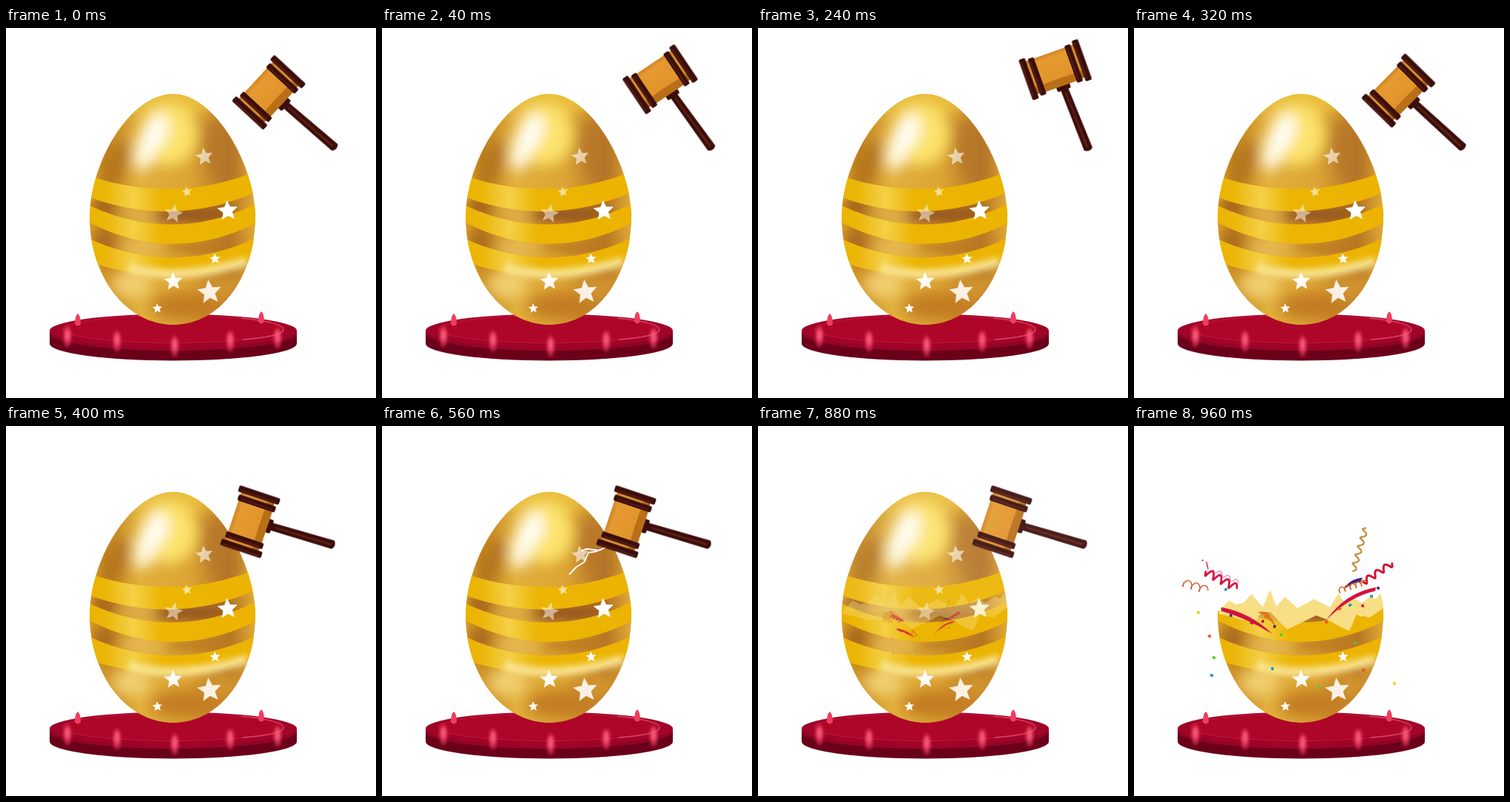
These frames come from a looping animation (500x500 px, 1.28 s). An HTML page:

```html
<!DOCTYPE html>
<html lang="en">
<head>
<meta charset="utf-8">
<title>Golden egg</title>
<style>
html, body { margin: 0; width: 100%; height: 100%; overflow: hidden; background: #fff; }
svg { display: block; width: 100vw; height: 100vh; }
.hammer, .old, .shell, .party, .crack, .crack path { animation: 1280ms -1ms infinite step-end; }
.hammer { animation-name: swing; }
.old { animation-name: vanish; }
.shell { animation-name: appear; }
.party { animation-name: burst; transform-origin: 228px 290px; }
.crack { animation-name: crackFade; fill: none; stroke: #fff; stroke-width: 2; stroke-linejoin: round; }
.crack path { stroke-dasharray: 1 2; }
.crack .first { animation-name: firstCrack; }
.crack .rest { animation-name: restCrack; }
@keyframes swing {
  0% { transform: rotate(-47.2deg); animation-timing-function: steps(4); }
  12.5% { transform: rotate(6.3deg); animation-timing-function: steps(6); }
  31.25%, 100% { transform: rotate(-71.5deg); }
}
@keyframes firstCrack {
  0%, 31.25% { stroke-dashoffset: 1.02; }
  31.25% { animation-timing-function: steps(4); }
  43.75%, 100% { stroke-dashoffset: 0; }
}
@keyframes restCrack {
  0%, 31.25% { stroke-dashoffset: 1.02; }
  31.25% { animation-timing-function: steps(7); }
  53.125%, 100% { stroke-dashoffset: 0; }
}
@keyframes crackFade {
  0% { opacity: 0; }
  34.375%, 53.125% { opacity: 1; }
  53.125% { animation-timing-function: steps(5); }
  68.75%, 100% { opacity: 0; }
}
@keyframes vanish {
  0% { opacity: 1; }
  68.75% { opacity: .93; }
  71.875% { opacity: .55; }
  75%, 100% { opacity: 0; }
}
@keyframes appear {
  0% { opacity: 0; }
  68.75% { opacity: .38; }
  71.875% { opacity: .7; }
  75%, 100% { opacity: 1; }
}
@keyframes burst {
  0% { opacity: 0; transform: scale(.05); }
  65.625% { opacity: 1; transform: scale(.05); animation-timing-function: steps(3); }
  75%, 100% { opacity: 1; transform: scale(1); }
}
</style>
</head>
<body>
<svg viewBox="0 0 500 500">
<defs>
  <path id="eggShape" d="M226 89C283 89 337 187 337 255C337 335 290 401 226 401C162 401 113 335 113 255C113 184 166 89 226 89Z"/>
  <clipPath id="eggClip"><use href="#eggShape"/></clipPath>
  <clipPath id="lowClip"><path d="M100 250H118L150 252L180 251L225 250L262 254L300 252L345 244V410H100Z"/></clipPath>
  <filter id="soft" x="-60%" y="-60%" width="220%" height="220%"><feGaussianBlur stdDeviation="9"/></filter>
  <filter id="sheen" x="-20%" y="-100%" width="140%" height="300%"><feGaussianBlur stdDeviation="4"/></filter>
  <filter id="glow" x="-100%" y="-100%" width="300%" height="300%"><feGaussianBlur stdDeviation="2"/></filter>
  <linearGradient id="gold" x1="0" x2="1">
    <stop offset="0" stop-color="#dfa72a"/><stop offset=".1" stop-color="#c2841f"/>
    <stop offset=".3" stop-color="#e2b03c"/><stop offset=".6" stop-color="#dca434"/>
    <stop offset=".84" stop-color="#b87828"/><stop offset="1" stop-color="#e0ab35"/>
  </linearGradient>
  <linearGradient id="band" gradientUnits="userSpaceOnUse" x1="113" x2="337" y1="0" y2="0">
    <stop offset="0" stop-color="#ebb300"/><stop offset=".1" stop-color="#ecb60a"/>
    <stop offset=".26" stop-color="#f4d046"/><stop offset=".44" stop-color="#ecb504"/>
    <stop offset="1" stop-color="#ecb300"/>
  </linearGradient>
  <linearGradient id="wood" x1="0" x2="0" y1="0" y2="1">
    <stop offset="0" stop-color="#d18424"/><stop offset=".14" stop-color="#e59a31"/>
    <stop offset=".78" stop-color="#e2942b"/><stop offset=".8" stop-color="#bf741a"/><stop offset="1" stop-color="#a8610f"/>
  </linearGradient>
  <linearGradient id="side" x1="0" x2="1">
    <stop offset="0" stop-color="#8d0325"/><stop offset=".5" stop-color="#a00529"/><stop offset="1" stop-color="#8d0325"/>
  </linearGradient>
  <polygon id="star" points="0,-1 .27,-.37 .95,-.31 .43,.14 .59,.81 0,.46 -.59,.81 -.43,.14 -.95,-.31 -.27,-.37"/>
  <g id="egg" clip-path="url(#eggClip)">
    <use href="#eggShape" fill="url(#gold)"/>
    <g filter="url(#soft)">
      <ellipse cx="228" cy="98" rx="62" ry="20" fill="#e9bd3a"/>
      <ellipse cx="148" cy="185" rx="13" ry="36" fill="#b3731b" transform="rotate(18 148 185)"/>
      <ellipse cx="290" cy="172" rx="22" ry="46" fill="#b4742a" transform="rotate(-18 290 172)" opacity=".75"/>
      <ellipse cx="220" cy="144" rx="38" ry="42" fill="#fbe26a"/>
      <ellipse cx="190" cy="160" rx="14" ry="34" fill="#fffbe8" transform="rotate(14 190 160)"/>
      <ellipse cx="204" cy="140" rx="15" ry="24" fill="#fffdf0" transform="rotate(16 204 140)"/>
      <ellipse cx="250" cy="252" rx="60" ry="14" fill="#95551c"/>
      <ellipse cx="132" cy="243" rx="17" ry="16" fill="#a5651a"/>
      <ellipse cx="178" cy="251" rx="26" ry="9" fill="#dba94a"/>
      <ellipse cx="268" cy="296" rx="55" ry="9" fill="#b8741f"/>
      <ellipse cx="132" cy="288" rx="17" ry="16" fill="#a8691b"/>
      <ellipse cx="180" cy="297" rx="27" ry="9" fill="#e6ba58"/>
      <ellipse cx="138" cy="348" rx="12" ry="26" fill="#d79a25" transform="rotate(-25 138 348)"/>
      <ellipse cx="170" cy="346" rx="25" ry="19" fill="#f1cf70"/>
      <ellipse cx="245" cy="376" rx="50" ry="19" fill="#c27b20"/>
      <ellipse cx="295" cy="352" rx="24" ry="18" fill="#d2942f"/>
    </g>
    <path d="M113 200Q228 238 337 194V222Q228 270 113 229Z" fill="url(#band)"/>
    <path d="M113 240Q225 292 337 238V264Q225 320 113 263Z" fill="url(#band)"/>
    <path d="M113 285Q225 336 337 284V310Q228 356 113 316Z" fill="url(#band)"/>
    <path d="M165 324Q232 344 326 315" fill="none" stroke="#f8e394" stroke-width="12" filter="url(#sheen)"/>
    <g fill="#fff">
      <use href="#star" transform="translate(268 174) rotate(-8) scale(12.5)" opacity=".6"/>
      <use href="#star" transform="translate(244.500 221.500) rotate(-10) scale(7)" opacity=".6"/>
      <use href="#star" transform="translate(226.500 251) rotate(10) scale(13)" opacity=".5"/>
      <use href="#star" transform="translate(299.500 247) rotate(-4) scale(14.500)"/>
      <use href="#star" transform="translate(282.500 312) rotate(-4) scale(7.500)" opacity=".95"/>
      <use href="#star" transform="translate(226 342.500) rotate(-3) scale(13)" opacity=".95"/>
      <use href="#star" transform="translate(275 357) rotate(-6) scale(17)" opacity=".88"/>
      <use href="#star" transform="translate(204.500 379) rotate(-3) scale(7)" opacity=".95"/>
    </g>
  </g>
  <g id="lamp">
    <ellipse rx="5" ry="14" fill="#ee3b62" opacity=".75" filter="url(#glow)"/>
    <ellipse cy="-2" rx="3" ry="8" fill="#ff6d87" opacity=".8" filter="url(#glow)"/>
  </g>
</defs>

<path d="M59 410V426.500A167 23 0 0 0 393 426.500V410Z" fill="#6a0019"/>
<path d="M59 410V413A167 23 0 0 0 393 413V410Z" fill="url(#side)"/>
<ellipse cx="226" cy="409" rx="167" ry="22.500" fill="#a00428"/>
<ellipse cx="226" cy="407" rx="150" ry="18.500" fill="#ae0629" stroke="#c01640"/>
<path d="M318 392Q376 398 375 408Q373 417 320 421" fill="none" stroke="#dc3f62" stroke-width="1.500"/>
<use href="#lamp" x="83" y="417"/>
<use href="#lamp" x="150" y="423"/>
<use href="#lamp" x="228" y="430"/>
<use href="#lamp" x="303" y="423"/>
<use href="#lamp" x="367" y="419"/>
<g fill="#ee3e62">
  <path d="M93 400Q93 389 97 386Q101 389 101 400Q97 405 93 400Z"/>
  <path d="M341 397Q341 386 345 383Q349 386 349 397Q345 402 341 397Z"/>
</g>

<g clip-path="url(#lowClip)"><use href="#egg"/></g>
<g class="old">
  <use href="#egg"/>
  <g class="crack">
    <path class="first" pathLength="1" d="M305 162L296 167L287 170L279 171L273 184L262 191L253 201"/>
    <path class="first" pathLength="1" d="M292 168L284 167L277 166L269 169"/>
    <path class="rest" pathLength="1" d="M287 170L283 180L274 186L273 204L272 214L266 225L261 234"/>
    <path class="rest" pathLength="1" d="M286 176L284 194L283 208L278 220L271 224"/>
  </g>
  <g transform="translate(441 166.500)">
    <g class="hammer">
      <path d="M-2.500 -92H8L12 -1Q6 4 0 -1Z" fill="#3b0d0b"/>
      <path d="M2 -84H4L7 -4H4Z" fill="#5e2014"/>
      <rect x="-7" y="-95" width="19" height="8" rx="2" fill="#3b0d0b"/>
      <rect x="-38" y="-141" width="76" height="47" fill="url(#wood)"/>
      <path d="M-23 -102Q0 -107 23 -101V-93H-23Z" fill="#b96f17"/>
      <g fill="#3b0d0b">
        <rect x="-42.500" y="-146" width="9" height="58" rx="2"/>
        <rect x="33.500" y="-146" width="9" height="58" rx="2"/>
        <rect x="-30.500" y="-143" width="8.500" height="53" rx="2"/>
        <rect x="22" y="-143" width="8.500" height="53" rx="2"/>
      </g>
      <path d="M-40 -142V-92M36 -142V-92M-28 -139V-94M25 -139V-94" stroke="#5e2014" stroke-width="1.500"/>
    </g>
  </g>
</g>
<path class="shell" fill="#f8de84" d="M114 254L117 247L128 236L138 241L148 239L159 227L174 245L184 221L192 244L204 231L221 246L243 234L265 245L276 226L285 240L297 232L308 239L320 230L327 234L333 226L337 242L336 247L318 259L301 254L291 277L280 272L262 262L246 256L230 264L207 275L194 262L183 250L172 251L166 262L146 262L130 257Z"/>
<g class="party" id="party" fill="none" stroke-linecap="round">
  <path d="M118 245Q157 252 187 281Q151 259 118 250Z" fill="#d3123f"/>
  <path d="M260 262Q286 225 327 218L326 223Q292 230 260 262Z" fill="#d3123f"/>
  <path d="M283 221Q292 206 309 205L306 211Q298 210 283 221Z" fill="#45207e"/>
  <path d="M167 252Q182 248 184 258Q190 264 192 273Q186 262 176 259Q177 254 167 252Z" fill="#e07a14"/>
  <path d="M98 184L100 193M92 181.500H93.500" stroke="#d8226a" stroke-width="1.500"/>
</g>
</svg>
<script>
const party = document.getElementById("party");

function add(tag, attrs) {
  const el = document.createElementNS("http://www.w3.org/2000/svg", tag);
  for (const k in attrs) el.setAttribute(k, attrs[k]);
  party.append(el);
}

// A ribbon waving around the line from (x1, y1) to (x2, y2); curl bends the waves into loops.
function ribbon(x1, y1, x2, y2, turns, amp, curl, color, width) {
  const dx = x2 - x1, dy = y2 - y1, len = Math.hypot(dx, dy);
  const ux = dx / len, uy = dy / len;
  const pts = [];
  for (let i = 0; i <= 80; i++) {
    const p = i / 80, a = p * turns * 2 * Math.PI;
    const side = amp * Math.sin(a), along = p * len + curl * amp * (Math.cos(a) - 1);
    pts.push((x1 + ux * along - uy * side).toFixed(1) + "," + (y1 + uy * along + ux * side).toFixed(1));
  }
  add("polyline", { points: pts.join(" "), stroke: color, "stroke-width": width });
}

ribbon(97, 197, 139, 219, 4, 5, .2, "#d3173f", 2.8);
ribbon(108, 195, 141, 212, 3, 3, .2, "#d8429a", 1);
ribbon(67, 212, 100, 222, 3, 5, .5, "#c9541e", 1.3);
ribbon(313, 138, 296, 196, 5, 3.5, .2, "#c08a35", 2.2);
ribbon(310, 211, 350, 185, 3.5, 4, .2, "#d0143a", 3);
ribbon(277, 222, 314, 211, 5, 3.5, .5, "#e2651c", 1.5);

const dots = {
  "#f0cb2b": [[87, 252], [352, 348]],
  "#ea5518": [[102, 284], [310, 330], [260, 265], [278, 247]],
  "#47cf2e": [[108, 313], [250, 353], [299, 293], [199, 282]],
  "#1799ab": [[105, 337], [187, 328], [124, 221], [292, 242], [321, 230]],
  "#58217e": [[330, 219], [131, 256], [190, 271]],
  "#c9163e": [[159, 266], [309, 243], [174, 264]]
};
for (const color in dots) {
  dots[color].forEach(([x, y], i) => add("rect", {
    x: x - 2, y: y - 1.7, width: 4, height: 3.4, fill: color,
    transform: `rotate(${25 + i * 40} ${x} ${y})`
  }));
}
</script>
</body>
</html>
```
